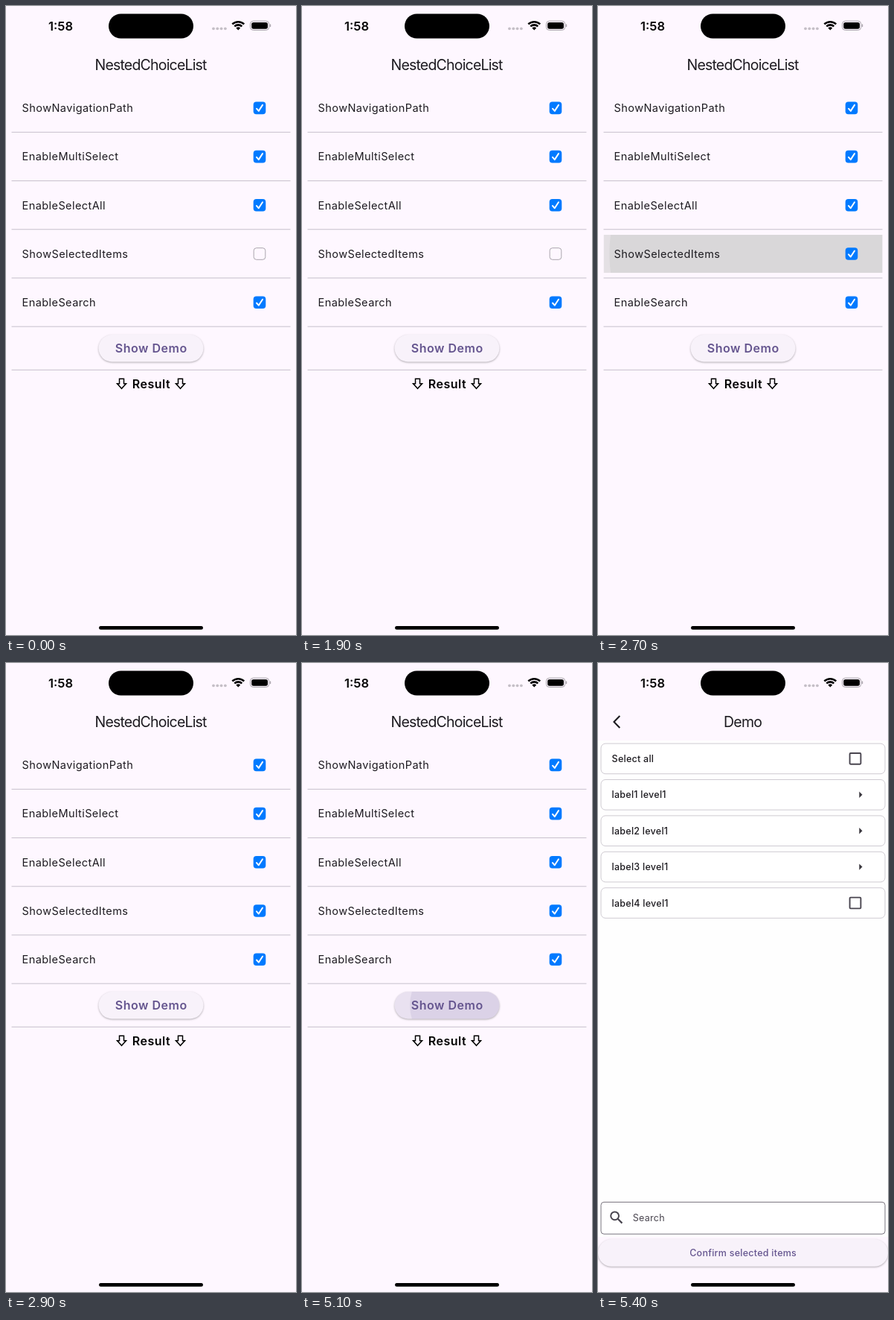
An HTML page with a canvas for the animation above (8000 ms loop, 390x844 px).

```html
<!DOCTYPE html>
<html lang="en">
<head>
<meta charset="utf-8">
<title>Nested choice list</title>
<style>
html, body { margin: 0; width: 100%; height: 100%; overflow: hidden; background: #fef7ff; }
canvas { display: block; width: 390px; height: 844px; }
</style>
</head>
<body>
<canvas id="stage"></canvas>
<script>
const W = 390, H = 844, LOOP = 8000, STEP = 100;
const SURFACE = '#fef7ff', INK = '#1d1b20', PRIMARY = '#65558f', MUTED = '#49454f';
const RAISED = '#f8f2fa', BLUE = '#007aff';

const canvas = document.getElementById('stage');
const ctx = canvas.getContext('2d');
const scale = window.devicePixelRatio || 1;
canvas.width = W * scale;
canvas.height = H * scale;
ctx.scale(scale, scale);

const clamp = v => Math.max(0, Math.min(1, v));
const lerp = (a, b, k) => a + (b - a) * k;

// cubic-bezier(.25, .1, .25, 1)
function ease(x) {
  const bezier = (a, b, s) => 3 * a * s * (1 - s) ** 2 + 3 * b * s * s * (1 - s) + s ** 3;
  let lo = 0, hi = 1;
  for (let i = 0; i < 24; i++) {
    const mid = (lo + hi) / 2;
    if (bezier(0.25, 0.25, mid) < x) lo = mid; else hi = mid;
  }
  return bezier(0.1, 1, lo);
}

function text(str, x, y, { size, weight = 400, color = INK, spacing = 0, center = false }) {
  ctx.font = `${weight} ${size}px Inter, sans-serif`;
  ctx.letterSpacing = spacing + 'px';
  ctx.fillStyle = color;
  const left = center ? x - (ctx.measureText(str).width - spacing) / 2 : x;
  ctx.fillText(str, left, y);
}

function roundRect(x, y, w, h, r) {
  ctx.beginPath();
  ctx.roundRect(x, y, w, h, r);
}

function box(x, y, w, h, r, fill, stroke, line = 1) {
  roundRect(x, y, w, h, r);
  if (fill) { ctx.fillStyle = fill; ctx.fill(); }
  if (stroke) { ctx.strokeStyle = stroke; ctx.lineWidth = line; ctx.stroke(); }
}

function polyline(points, color, line, closed = false) {
  ctx.beginPath();
  points.forEach(([x, y]) => ctx.lineTo(x, y));
  if (closed) ctx.closePath();
  ctx.strokeStyle = color;
  ctx.lineWidth = line;
  ctx.stroke();
}

function dot(x, y, r, color) {
  ctx.beginPath();
  ctx.arc(x, y, r, 0, Math.PI * 2);
  ctx.fillStyle = color;
  ctx.fill();
}

function pill(x, y, w, h) {
  ctx.save();
  ctx.shadowColor = 'rgba(0,0,0,0.3)';
  ctx.shadowBlur = 2.5 * scale;
  ctx.shadowOffsetY = 1 * scale;
  box(x, y, w, h, h / 2, RAISED);
  ctx.restore();
}

// Press feedback: a flat highlight plus a circle drifting to the middle.
function press(t, p) {
  if (t < p.start || t >= p.end) return;
  const age = t - p.start;
  const out = 1 - clamp((t - p.release) / (p.end - p.release));
  const k = ease(clamp(age / p.duration));
  const { x, y, w, h, r } = p.rect;
  const reach = Math.hypot(w, h) / 2;
  ctx.save();
  roundRect(x, y, w, h, r);
  ctx.clip();
  ctx.globalAlpha = p.alpha * clamp(age / 200) * out;
  ctx.fillStyle = p.highlight;
  ctx.fillRect(x, y, w, h);
  ctx.globalAlpha = p.alpha * clamp(age / 75) * out;
  dot(lerp(p.tapX, x + w / 2, k), y + h / 2, lerp(reach * 0.3, reach + 5, k), p.splash);
  ctx.restore();
}

const rowPress = {
  start: 1960, release: 2700, end: 2900, duration: 1030, tapX: 341, alpha: 0.4,
  highlight: '#bcbcbc', splash: '#c8c8c8', rect: { x: 7.5, y: 307, w: 375, h: 51, r: 0 }
};
const buttonPress = {
  start: 4560, release: 5300, end: 5300, duration: 1200, tapX: 250, alpha: 0.1,
  highlight: PRIMARY, splash: PRIMARY, rect: { x: 124.5, y: 441, w: 141, h: 36.5, r: 18.25 }
};

function statusBar() {
  text('1:58', 73.5, 32.5, { size: 16.5, weight: 600, color: '#000', center: true });
  box(138, 10.5, 114, 33, 16.5, '#000');
  for (let i = 0; i < 4; i++) dot(279 + i * 5.3, 30.3, 1.9, '#c5bfc7');

  const fan = [-Math.PI * 0.745, -Math.PI * 0.255];
  ctx.strokeStyle = ctx.fillStyle = '#000';
  ctx.lineWidth = 2.6;
  for (const r of [11.4, 7.2]) {
    ctx.beginPath();
    ctx.arc(312.3, 32.6, r, ...fan);
    ctx.stroke();
  }
  ctx.beginPath();
  ctx.moveTo(312.3, 32.6);
  ctx.arc(312.3, 32.6, 4.2, ...fan);
  ctx.fill();

  box(328.5, 20.2, 25.2, 12.2, 4, null, '#a6a1a8');
  box(330.2, 21.9, 21.8, 8.8, 2.6, '#000');
  box(354.8, 24.3, 1.4, 4, 0.7, '#a6a1a8');
}

function checkbox(cy, checked) {
  if (!checked) return box(333.2, cy - 7.8, 15.6, 15.6, 3.6, null, '#aaa5ad');
  box(332.7, cy - 8.3, 16.6, 16.6, 4, BLUE);
  ctx.lineCap = ctx.lineJoin = 'round';
  polyline([[337, cy + 0.8], [339.8, cy + 4], [345, cy - 4]], '#fff', 2);
  ctx.lineCap = 'butt';
  ctx.lineJoin = 'miter';
}

function downArrow(cx) {
  const half = [[3, 500.3], [3, 506.8], [6, 506.8]];
  const left = half.map(([x, y]) => [cx - x, y]);
  const right = half.map(([x, y]) => [cx + x, y]).reverse();
  polyline([...left, [cx, 513.3], ...right], '#000', 1.5, true);
}

function settingsPage(t) {
  text('NestedChoiceList', 195, 86, { size: 19.5, spacing: -0.8, center: true });
  press(t, rowPress);
  const names = ['ShowNavigationPath', 'EnableMultiSelect', 'EnableSelectAll', 'ShowSelectedItems', 'EnableSearch'];
  const divider = y => { ctx.fillStyle = '#cbc5d0'; ctx.fillRect(7.5, y - 0.5, 375, 1.1); };
  names.forEach((name, i) => {
    const cy = 136.9 + i * 65.2;
    text(name, 21.6, cy + 5.3, { size: 14.5, spacing: 0.42 });
    checkbox(cy, i !== 3 || t >= rowPress.release);
    divider(169.3 + i * 65.2);
  });
  const { x, y, w, h } = buttonPress.rect;
  pill(x, y, w, h);
  press(t, buttonPress);
  text('Show Demo', 195, 464.7, { size: 16, weight: 600, color: PRIMARY, spacing: 0.5, center: true });
  divider(488.3);
  text('Result', 195.2, 512.6, { size: 16, weight: 600, color: '#000', spacing: 0.5, center: true });
  downArrow(155.5);
  downArrow(234.5);
}

function demoPage() {
  ctx.fillStyle = '#fefefe';
  ctx.fillRect(0, 104, W, 666);
  polyline([[29.3, 71], [21.5, 79], [29.3, 87]], INK, 2.1);
  text('Demo', 195, 86, { size: 19.5, spacing: -0.8, center: true });

  const items = ['Select all', 'label1 level1', 'label2 level1', 'label3 level1', 'label4 level1'];
  items.forEach((name, i) => {
    const cy = 128.4 + i * 48.4;
    box(4, cy - 20.3, 382, 40.6, 6, '#fff', '#cfcbd2');
    text(name, 18.6, cy + 4.5, { size: 12.5, weight: 500, spacing: 0.25 });
    if (i % 4 === 0) {
      box(338.6, cy - 7.4, 14.8, 14.8, 1.2, null, MUTED, 1.9);
    } else {
      ctx.beginPath();
      ctx.moveTo(351.3, cy - 4.2);
      ctx.lineTo(355.5, cy);
      ctx.lineTo(351.3, cy + 4.2);
      ctx.fillStyle = '#39363d';
      ctx.fill();
    }
  });

  box(4, 723.4, 382, 42.8, 4, '#fff', '#79747e');
  ctx.beginPath();
  ctx.arc(22.6, 741.8, 5.4, 0, Math.PI * 2);
  ctx.strokeStyle = MUTED;
  ctx.lineWidth = 2;
  ctx.stroke();
  polyline([[26.6, 745.8], [32.4, 751.6]], MUTED, 2.2);
  text('Search', 46.8, 748.7, { size: 12.5, color: MUTED, spacing: 0.25 });
  pill(0, 773, 390, 36.8);
  text('Confirm selected items', 195, 796, { size: 12.5, weight: 500, color: PRIMARY, spacing: 0.25, center: true });
}

function draw(now) {
  const t = Math.floor((now % LOOP) / STEP) * STEP;
  ctx.fillStyle = SURFACE;
  ctx.fillRect(0, 0, W, H);
  if (t < buttonPress.end) settingsPage(t); else demoPage();
  statusBar();
  box(125, 832, 140, 4.8, 2.4, '#000');
}

let origin;
function tick(now) {
  origin ??= now;
  draw(now - origin);
  requestAnimationFrame(tick);
}
draw(0);
requestAnimationFrame(tick);
</script>
</body>
</html>
```
